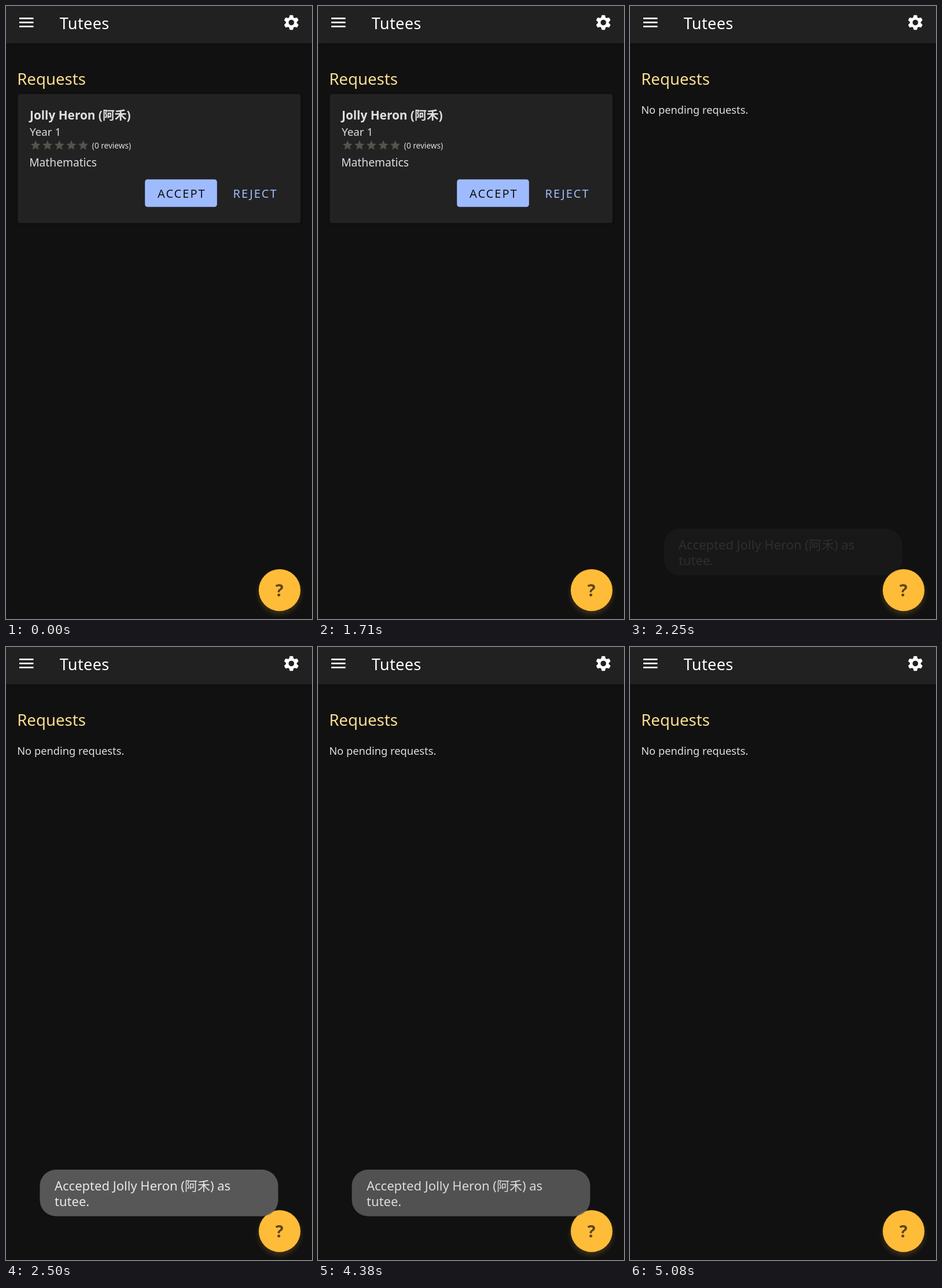
Animation of 529x1058 px, one loop 5.37 s. Source, as an HTML page with a canvas:

```html
<!DOCTYPE html>
<html lang="en">
<head>
<meta charset="utf-8">
<title>Tutees</title>
<style>
  html, body { margin: 0; width: 100%; height: 100%; overflow: hidden; background: #111; }
  canvas { display: block; }
</style>
</head>
<body>
<canvas id="stage" width="529" height="1058"></canvas>
<script>
const ctx = document.getElementById('stage').getContext('2d');
const LOOP = 5370;
const FAMILY = '"Noto Sans", "Noto Sans CJK SC", "Noto Sans CJK", sans-serif';
const NAME = 'Jolly Heron (阿禾)';
const STAR = new Path2D('M12 17.27L18.18 21l-1.64-7.03L22 9.24l-7.19-.61L12 2 9.19 8.63 2 9.24l5.46 4.73L5.82 21z');

const TAP = 2040, CARD_GONE = 2180;
const TOAST_IN = { start: 2220, length: 315 };
const TOAST_OUT = { start: 4350, length: 320 };

const progress = (t, { start, length }) => Math.min(1, Math.max(0, (t - start) / length));

function text(str, x, y, size, color, weight = 400, spacing = 0) {
  ctx.font = `${weight} ${size}px ${FAMILY}`;
  ctx.letterSpacing = spacing + 'px';
  ctx.fillStyle = color;
  ctx.fillText(str, x, y);
}

function box(x, y, w, h, r, color) {
  ctx.fillStyle = color;
  ctx.beginPath();
  ctx.roundRect(x, y, w, h, r);
  ctx.fill();
}

function disc(x, y, r, color) {
  ctx.fillStyle = color;
  ctx.beginPath();
  ctx.arc(x, y, r, 0, Math.PI * 2);
  ctx.fill();
}

function withShadow(color, blur, dy, draw) {
  ctx.save();
  ctx.shadowColor = color;
  ctx.shadowBlur = blur;
  ctx.shadowOffsetY = dy;
  draw();
  ctx.restore();
}

function gear(x, y) {
  ctx.save();
  ctx.translate(x, y);
  disc(0, 0, 9.4, '#fff');
  for (let i = 0; i < 6; i++) {
    ctx.beginPath();
    ctx.moveTo(-4, -8);
    ctx.lineTo(-2.9, -12.2);
    ctx.lineTo(-2.3, -12.8);
    ctx.lineTo(2.3, -12.8);
    ctx.lineTo(2.9, -12.2);
    ctx.lineTo(4, -8);
    ctx.fill();
    ctx.rotate(Math.PI / 3);
  }
  disc(0, 0, 4.8, '#212121');
  ctx.restore();
}

function header() {
  withShadow('rgba(0,0,0,.3)', 4, 1, () => box(0, 0, 529, 64.5, 0, '#212121'));
  for (let i = 0; i < 3; i++) box(23, 20 + i * 7, 24.5, 2.7, 0, '#fff');
  text('Tutees', 92.8, 39.5, 27.2, '#fff', 400, 0.3);
  gear(493.3, 28.5);
}

function requestCard(t) {
  withShadow('rgba(0,0,0,.25)', 4, 1, () => box(20.5, 152, 488.5, 222.5, 3, '#222'));
  text(NAME, 41, 196, 20.8, '#e0e0e0', 600);
  text('Year 1', 41, 224, 18.8, '#dedede');
  for (let i = 0; i < 5; i++) {
    ctx.save();
    ctx.translate(40.8 + i * 20.6, 230);
    ctx.scale(0.858, 0.858);
    ctx.fillStyle = '#54544c';
    ctx.fill(STAR);
    ctx.restore();
  }
  text('(0 reviews)', 148.8, 246, 13.6, '#dedede');
  text('Mathematics', 40.2, 276.5, 19.2, '#dedede');

  box(240.2, 299.3, 124.6, 47.4, 4.5, t < TAP ? '#9fbbff' : '#a9c3ff');
  text('ACCEPT', 262, 331, 20, '#111', 400, 2);
  text('REJECT', 392.5, 331, 20, '#9fbbff', 400, 2);
}

function helpButton() {
  withShadow('rgba(255,188,56,.2)', 10, 5, () => disc(473, 1008.2, 36.1, '#ffbc38'));
  text('?', 465.8, 1019, 29, '#5a431a', 800);
}

function toast(alpha) {
  ctx.save();
  ctx.globalAlpha = alpha;
  box(58.5, 902, 412, 80.5, 28, '#606060');
  text(`Accepted ${NAME} as`, 84, 937.5, 22, '#fafafa');
  text('tutee.', 84, 965, 22, '#fafafa');
  ctx.restore();
}

function draw(t) {
  ctx.fillStyle = '#111';
  ctx.fillRect(0, 0, 529, 1058);
  header();
  text('Requests', 19.2, 136, 27.6, '#fade8e');
  if (t < CARD_GONE) requestCard(t);
  else text('No pending requests.', 19.2, 186, 18.3, '#dedede');
  helpButton();

  const alpha = progress(t, TOAST_IN) * (1 - progress(t, TOAST_OUT)) ** 2;
  if (alpha > 0) toast(alpha);
}

const begin = performance.now();
function tick() {
  draw((performance.now() - begin) % LOOP);
  requestAnimationFrame(tick);
}
tick();
</script>
</body>
</html>
```
